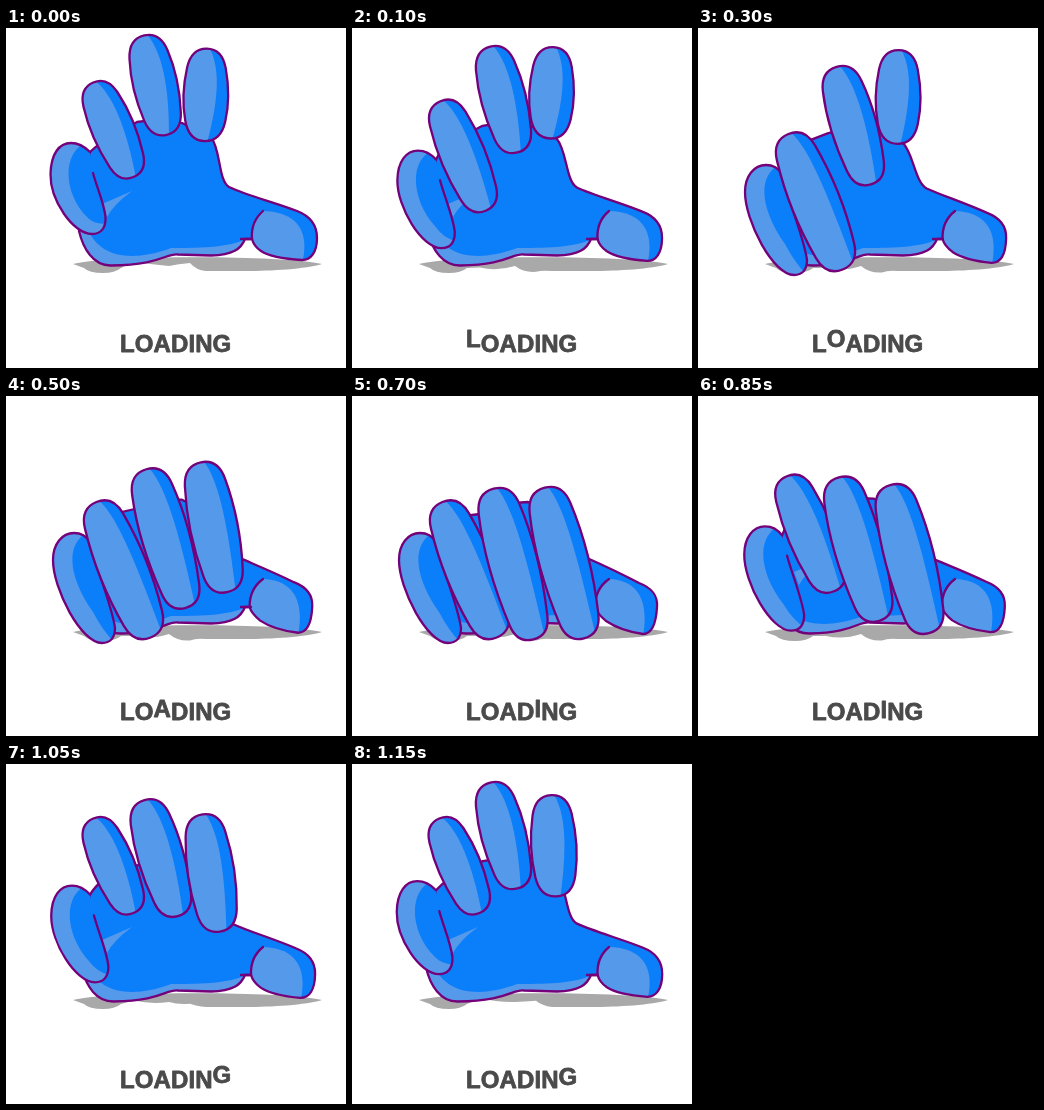
An HTML page with a canvas for the animation above (1200 ms loop, 340 px wide and 340 px high).

```html
<!DOCTYPE html>
<html>
<head>
<meta charset="utf-8">
<style>
html, body { margin: 0; width: 100%; height: 100%; overflow: hidden; background: #fff; }
canvas { display: block; width: 340px; height: 340px; }
</style>
</head>
<body>
<canvas id="stage" width="340" height="340"></canvas>
<script>
const ctx = document.getElementById('stage').getContext('2d');
const LOOP = 1200, STEP = 50;
const BLUE = '#0b7efa', LIGHT = '#5599eb', LINE = '#74007a', SHADE = '#a9a9a9', INK = '#4a4a4a';

// Fold amount over time: [ms, 0 = open .. 1 = closed]
const fold = {
  thumb: [[0, 0], [600, .95], [700, 1], [950, .5], [1150, .13], [1200, 0]],
  pinky: [[0, 0], [290, 1], [700, 1], [1200, 0]],
  ring: [[0, 0], [275, 1], [700, 1], [1000, 0], [1200, 0]],
  middle: [[0, 0], [100, .13], [300, .365], [500, .77], [620, 1], [800, 1], [1100, .2], [1150, .13], [1200, 0]],
  index: [[0, .02], [100, 0], [250, 0], [300, .04], [500, .65], [615, 1], [835, 1], [950, .7], [1150, .165], [1200, .02]]
};

// Knuckle and tip circles: [x, y, r] when open and when closed
const fingers = [
  { name: 'ring', a: [[94.5, 71.5, 18.5], [98, 125, 20.5]], b: [[120.5, 132.5, 18], [137, 222.5, 20.5]], sway: 0 },
  { name: 'middle', a: [[142.5, 26.5, 19.5], [147, 113, 21]], b: [[156.5, 88.5, 18.8], [176.5, 224.5, 19.5]], sway: 4 },
  { name: 'index', a: [[200.5, 38.5, 19.3], [198, 112, 21]], b: [[198.7, 90.5, 20], [227, 223, 20]], sway: 0 }
];

const mix = (a, b, k) => a + (b - a) * k;

function at(keys, t) {
  let i = 1;
  while (i < keys.length - 1 && keys[i][0] < t) i++;
  const [t0, v0] = keys[i - 1], [t1, v1] = keys[i];
  return mix(v0, v1, (t - t0) / (t1 - t0));
}

function fill(path, color) {
  ctx.fillStyle = color;
  ctx.fill(path);
}

function stroke(path) {
  ctx.strokeStyle = LINE;
  ctx.lineWidth = 2.3;
  ctx.stroke(path);
}

function shape(base, light) {
  fill(base, BLUE);
  ctx.save();
  ctx.clip(base);
  light.forEach(p => fill(p, LIGHT));
  ctx.restore();
  stroke(base);
}

// The bumps under the folded fingers grow with k
function drawShadow(k) {
  const low = mix(236, 245.5, k), mid = mix(236, 243, k);
  fill(new Path2D(`M67 236C100 227 280 227 316 236C300 241 265 243 240 243L200 243Q190 242 184 ${low - 1}` +
    `Q172 ${low} 163 238Q145 ${mid + 1} 128 ${mid - 3}L115 240Q109 245 97 245Q83 245 78 240Z`), SHADE);
}

function drawBody(k, kp) {
  const x = (a, b) => mix(a, b, k), q = (a, b) => mix(a, b, kp);
  const body = new Path2D();
  body.moveTo(84, q(124, 146));
  body.quadraticCurveTo(90, x(118, 128), 96, x(115, 122));
  body.lineTo(x(131, 128), x(94, 118));
  body.quadraticCurveTo(155, x(90, 106), 176, x(95, 106));
  body.lineTo(x(205, 203), x(109, 120));
  body.bezierCurveTo(x(215, 216), x(122, 126), x(212, 222), x(152, 157), x(223, 235), x(159, 162));
  body.bezierCurveTo(x(242, 244), x(168, 166), x(268, 266), x(174, 176), x(291, 287), x(183, 187));
  body.bezierCurveTo(x(304, 300), x(188, 192), x(311, 306), x(197, 199), x(311, 305), x(210, 211));
  body.bezierCurveTo(x(311, 304), x(224, 229), x(305, 300), x(232, 238), x(296, 291), x(232, 238));
  body.bezierCurveTo(x(280, 277), x(231, 236), x(264, 263), x(229, 231), x(255, 254), x(223, 225));
  body.bezierCurveTo(x(249, 247), x(219, 219), x(247, 244), x(215, 215), x(246, 243), 211);
  body.lineTo(239, 211);
  body.bezierCurveTo(235, 221, 227, 227, 205, 227.5);
  body.lineTo(172, 226.5);
  body.bezierCurveTo(160, 225, 155, 237, q(105, 115), 237.5);
  body.bezierCurveTo(q(87, 98), 238, q(77, 88), q(220, 226), q(73, 85), q(203, 215));
  body.lineTo(q(74, 78), q(160, 185));
  body.closePath();

  const palm = new Path2D('M60 190L82 201C92 227 122 236 165 220C190 220 222 220 240 211L242 250L60 250Z');
  const crease = new Path2D('M126 163L96 176L101 189Q108 176 126 163Z');

  const pad = new Path2D();
  pad.moveTo(257, 183);
  pad.bezierCurveTo(x(249, 247), 190, x(245, 243), 199, x(246, 243), 211);
  const edge = new Path2D(pad);
  pad.bezierCurveTo(x(247, 245), 220, 255, x(227, 230), x(295, 290), x(240, 245));
  pad.bezierCurveTo(x(305, 298), x(205, 208), x(293, 288), 184, 257, 183);

  shape(body, [palm, crease, pad]);
  stroke(edge);
  stroke(new Path2D('M235 211H245'));
}

function drawPinky(k) {
  const m = (a, b) => mix(a, b, k);
  const p = new Path2D();
  p.moveTo(m(87, 90), m(145, 166));
  p.bezierCurveTo(m(91, 95), m(160, 185), m(98, 107), m(175, 215), m(99.5, 109), m(189, 232));
  p.bezierCurveTo(m(100, 109), m(200, 242), m(95, 104), m(206, 247), m(86, 96), m(206, 247));
  p.bezierCurveTo(m(67, 75), m(206, 247), m(44, 47), m(172, 193), m(44.5, 47), m(146, 164));
  p.bezierCurveTo(m(45, 47), m(126, 148), m(53, 56), m(115, 137), m(65, 68), m(115, 137));
  p.bezierCurveTo(m(73, 76), m(115, 137), m(79, 81), m(119, 141), 84, m(124, 146));

  const light = new Path2D();
  light.moveTo(m(82, 80), m(114, 137));
  light.bezierCurveTo(m(56, 59), m(122, 150), m(56, 63), m(165, 182), m(82, 87), m(190, 216));
  light.quadraticCurveTo(m(88, 97), m(196, 235), m(101, 108), m(196, 246));
  light.lineTo(100, 260);
  light.lineTo(30, 260);
  light.lineTo(30, 110);
  light.closePath();
  shape(p, [light]);
}

function drawFinger(f, k) {
  const [ax, ay, ar] = f.a[0].map((v, i) => mix(v, f.a[1][i], k));
  let [bx, by, br] = f.b[0].map((v, i) => mix(v, f.b[1][i], k));
  bx += f.sway * Math.sin(Math.PI * k);
  const len = Math.hypot(bx - ax, by - ay), c = .6;
  const bulge = 2 + len * .03, third = len / 3;
  const lean = bulge / third * c;

  // Local axes: y runs from knuckle to tip
  ctx.save();
  ctx.translate(ax, ay);
  ctx.rotate(Math.atan2(by - ay, bx - ax) - Math.PI / 2);
  const p = new Path2D();
  p.moveTo(-ar, 0);
  p.bezierCurveTo(-ar * (1 - lean), -ar * c, -ar * c, -ar, 0, -ar);
  p.bezierCurveTo(ar * c, -ar, ar * (1 - lean), -ar * c, ar, 0);
  p.bezierCurveTo(ar + bulge, third, br + bulge, len - third, br, len);
  p.bezierCurveTo(br * (1 - lean), len + br * c, br * c, len + br, 0, len + br);
  p.bezierCurveTo(-br * c, len + br, -br * (1 - lean), len + br * c, -br, len);
  p.bezierCurveTo(-br - bulge, len - third, -ar - bulge, third, -ar, 0);
  p.closePath();

  const light = new Path2D();
  light.moveTo(ar * .1, -ar * 1.1);
  light.bezierCurveTo(ar * .75, 0, ar * .65, len * .6, br * mix(.1, .6, k), len + br * 1.1);
  light.lineTo(-40, len + br * 1.1);
  light.lineTo(-40, -ar * 1.1);
  light.closePath();
  shape(p, [light]);
  ctx.restore();
}

function drawText(t) {
  const starts = [0, 171, 343, 514, 686, 857, 1000, 1160];
  ctx.font = 'bold 24px "Liberation Sans", Arial, sans-serif';
  ctx.fillStyle = ctx.strokeStyle = INK;
  ctx.lineWidth = .8;
  let x = 114;
  [...'LOADING'].forEach((ch, i) => {
    const u = (t - starts[i]) / (starts[i + 1] - starts[i]);
    const hop = u > 0 && u < 1 ? 5 * Math.pow(Math.sin(Math.PI * u), .4) : 0;
    ctx.fillText(ch, x, 323.7 - hop);
    ctx.strokeText(ch, x, 323.7 - hop);
    x += ctx.measureText(ch).width + .1;
  });
}

function draw(t) {
  ctx.fillStyle = '#fff';
  ctx.fillRect(0, 0, 340, 340);
  ctx.lineJoin = ctx.lineCap = 'round';
  const k = {};
  for (const name in fold) k[name] = at(fold[name], t);
  drawShadow(Math.min(1, k.ring * 2 + k.middle * 1.5));
  drawBody(k.thumb, k.pinky);
  drawPinky(k.pinky);
  fingers.forEach(f => drawFinger(f, k[f.name]));
  drawText(t);
}

const begin = performance.now();
function tick() {
  const t = (performance.now() - begin) % LOOP;
  draw(Math.floor(t / STEP) * STEP);
  requestAnimationFrame(tick);
}
tick();
</script>
</body>
</html>
```
